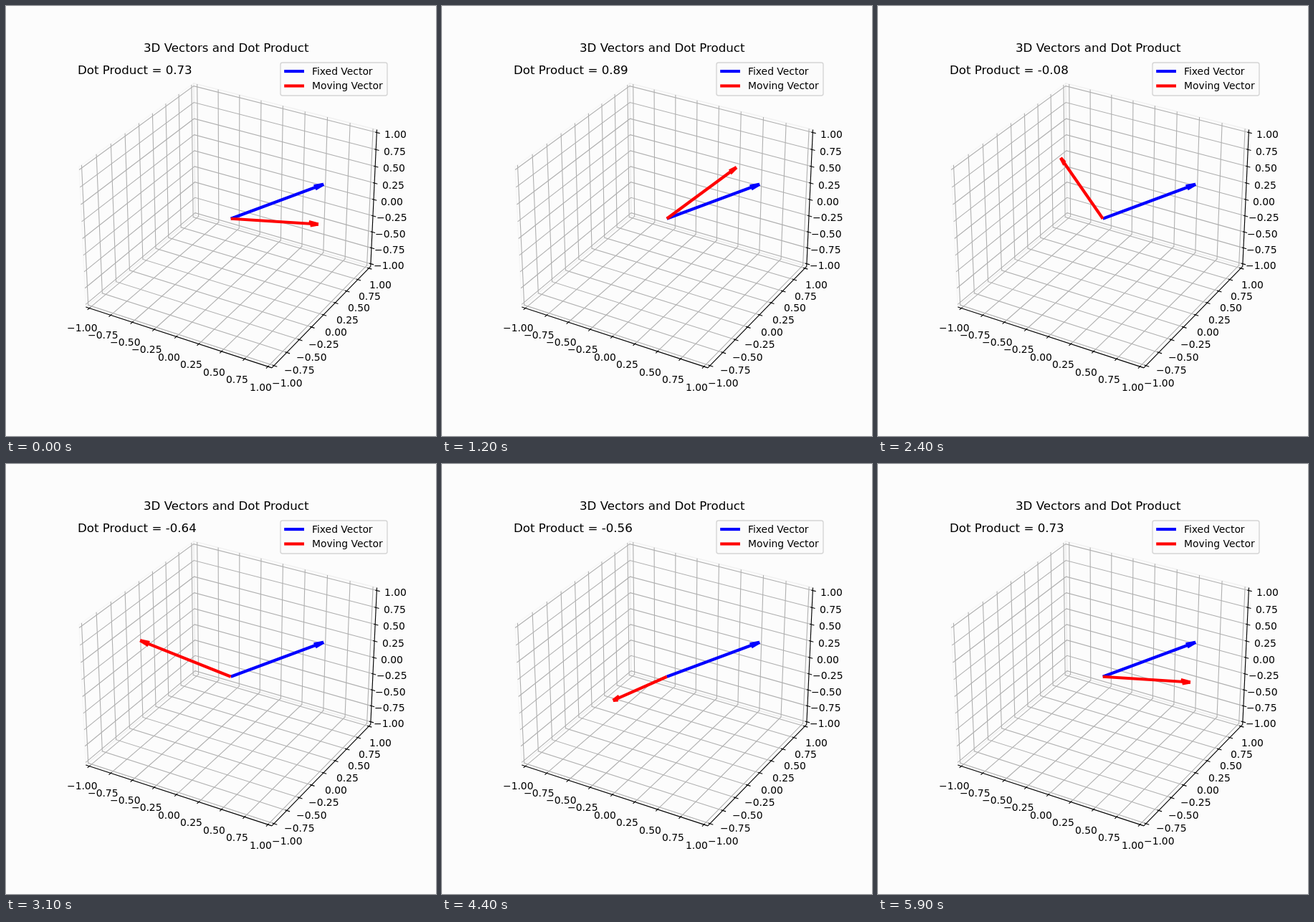
Animation of 600 by 600 pixels, one loop 6 s. Source, as an HTML page with a canvas:

```html
<!DOCTYPE html>
<html>
<head>
<meta charset="utf-8">
<style>
  html, body { margin: 0; width: 100%; height: 100%; overflow: hidden; background: #fcfcfc; }
  canvas { display: block; }
</style>
</head>
<body>
<canvas id="stage" width="600" height="600"></canvas>
<script>
const ctx = document.getElementById('stage').getContext('2d');
const STEPS = 60, STEP_MS = 100;
const PT = 100 / 72;            // pixels per point
const EDGE = 25 / 24;           // box half-size in data units
const LABEL = EDGE + 0.1383;    // distance of tick labels from the centre
const TICKS = [-1, -0.75, -0.5, -0.25, 0, 0.25, 0.5, 0.75, 1];
const FIXED = [2 / 3, 2 / 3, 1 / 3];

// Perspective camera: elevation 30°, azimuth -60°, distance 10
const S3 = Math.sqrt(3);
function project([a, b, c]) {
  const x = a * 4 / 7, y = b * 4 / 7, z = c * 3 / 7;
  const right = x * S3 / 2 + y / 2;
  const up = -x / 4 + y * S3 / 4 + z * S3 / 2;
  const depth = 10 - (x * S3 / 4 - y * 0.75 + z / 2);
  const scale = 462 / 0.185 / depth;
  return [313.74 + right * scale, 296.76 - up * scale];
}

function line(points, color, points_wide, closed) {
  ctx.beginPath();
  for (const p of points) ctx.lineTo(...project(p));
  if (closed) ctx.closePath();
  ctx.strokeStyle = color;
  ctx.lineWidth = points_wide * PT;
  ctx.stroke();
}

function text(str, x, y, size, centered) {
  ctx.font = `${size * PT}px "DejaVu Sans", sans-serif`;
  ctx.fillStyle = '#000';
  if (centered) x -= ctx.measureText(str).width / 2;
  ctx.fillText(str, Math.round(x), Math.round(y));
}

function drawBox() {
  const E = EDGE, IN = E - 1 / 60, OUT = E + 1 / 30;
  line([[-E, -E, -E], [-E, E, -E], [-E, E, E], [-E, -E, E]], 'rgba(242,242,242,.5)', 1, true);
  line([[-E, E, -E], [E, E, -E], [E, E, E], [-E, E, E]], 'rgba(230,230,230,.5)', 1, true);
  line([[-E, -E, -E], [E, -E, -E], [E, E, -E], [-E, E, -E]], 'rgba(236,236,236,.5)', 1, true);

  const axes = [
    { ends: [[-E, -E, -E], [E, -E, -E]],
      grid: t => [[t, -E, -E], [t, E, -E], [t, E, E]],
      tick: t => [[t, -IN, -E], [t, -OUT, -E]],
      label: t => [t, -LABEL, -LABEL] },
    { ends: [[E, -E, -E], [E, E, -E]],
      grid: t => [[E, t, -E], [-E, t, -E], [-E, t, E]],
      tick: t => [[IN, t, -E], [OUT, t, -E]],
      label: t => [LABEL, t, -LABEL] },
    { ends: [[E, E, -E], [E, E, E]],
      grid: t => [[-E, -E, t], [-E, E, t], [E, E, t]],
      tick: t => [[IN, E, t], [OUT, E, t]],
      label: t => [LABEL, LABEL, t] },
  ];
  for (const { grid } of axes)
    for (const t of TICKS) line(grid(t), '#b0b0b0', 0.8);
  for (const { ends, tick, label } of axes) {
    line(ends, '#000', 0.8);
    for (const t of TICKS) {
      line(tick(t), '#000', 0.8);
      const [x, y] = project(label(t));
      text(t.toFixed(2).replace('-', '\u2212'), x, y + 11, 10, true);
    }
  }
}

// Unit vector with a head of two strokes tilted 15° up and down
function arrow(v, color) {
  const [x, y, z] = v, h = Math.hypot(x, y);
  const normal = [-z * x / h, -z * y / h, h];
  line([[0, 0, 0], v], color, 3);
  for (const tilt of [15, -15]) {
    const r = tilt * Math.PI / 180;
    const back = v.map((c, i) => c - 0.1 * (c * Math.cos(r) + normal[i] * Math.sin(r)));
    line([back, v], color, 3);
  }
}

function drawLegend() {
  ctx.beginPath();
  ctx.roundRect(383, 79, 149, 46, 2.8);
  ctx.fillStyle = 'rgba(252,252,252,.8)';
  ctx.fill();
  ctx.strokeStyle = 'rgba(204,204,204,.8)';
  ctx.lineWidth = PT;
  ctx.stroke();
  [['Fixed Vector', '#00f'], ['Moving Vector', '#f00']].forEach(([name, color], i) => {
    ctx.fillStyle = color;
    ctx.fillRect(388.2, 89 + i * 20.4, 27.8, 3 * PT);
    text(name, 427, 96 + i * 20, 10);
  });
}

function draw() {
  const step = Math.floor(performance.now() / STEP_MS) % STEPS;
  const angle = 2 * Math.PI * step / (STEPS - 1);
  const moving = [Math.cos(angle), Math.sin(angle), 0.3].map(c => c / Math.hypot(1, 0.3));
  const dot = moving.reduce((sum, c, i) => sum + c * FIXED[i], 0);

  ctx.fillStyle = '#fcfcfc';
  ctx.fillRect(0, 0, 600, 600);
  drawBox();
  arrow(FIXED, '#00f');
  arrow(moving, '#f00');
  text('3D Vectors and Dot Product', 307.5, 64, 12, true);
  text('Dot Product = ' + dot.toFixed(2), 100, 95, 12);
  drawLegend();
  requestAnimationFrame(draw);
}
draw();
</script>
</body>
</html>
```
